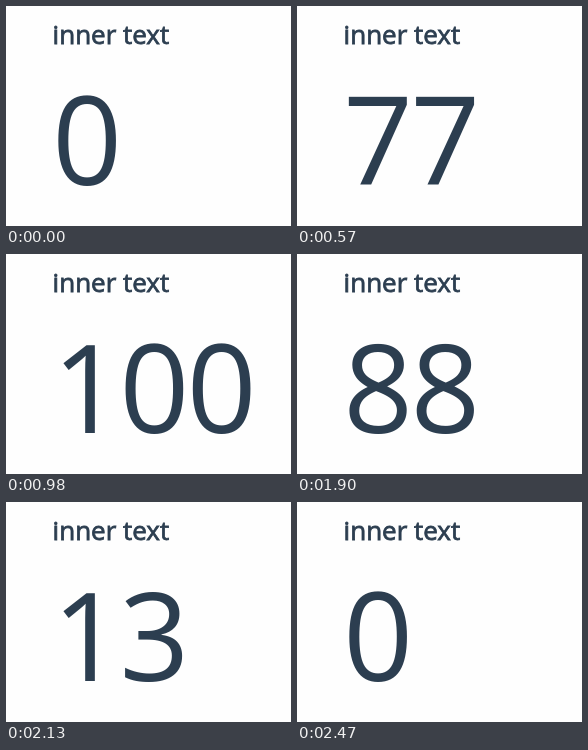
These frames come from a looping animation (285 by 220 pixels, 2.75 s). An HTML page:

```html
<!DOCTYPE html>
<html lang="en">
<head>
<meta charset="utf-8">
<title>Counter</title>
<style>
  html, body { margin: 0; width: 100%; height: 100%; overflow: hidden; background: #fefefe; }
  svg { display: block; width: 100vw; height: 100vh; }
  text { fill: #2c3e50; font-family: "Open Sans", "Noto Sans", sans-serif; }
  .title { font-size: 26px; stroke: #2c3e50; stroke-width: 0.8px; }
  .count { font-size: 122px; letter-spacing: -2.5px; }
</style>
</head>
<body>
<svg viewBox="0 0 285 220">
  <text class="title" x="46.6" y="38">inner text</text>
  <text class="count" id="count" x="46.2" y="179">0</text>
</svg>
<script>
  const LOOP = 2750;
  const UP = 400;
  const DOWN = 1900;
  // Moments, after each start, at which the shown number refreshes
  const upTicks = [0, 50, 80, 130, 170, 210, 260, 310, 340, 390, 440, 580];
  const downTicks = [0, 30, 80, 130, 180, 230, 260, 300, 340, 390, 440, 570];
  const label = document.getElementById('count');

  // Distance left to the goal, easing out
  const left = ms => Math.round(88 * Math.pow(1 - ms / 850, 6));
  const lastTick = (ticks, ms) => ticks.filter(t => t <= ms).pop();

  function valueAt(ms) {
    if (ms < UP) return 0;
    if (ms < DOWN) return 100 - left(lastTick(upTicks, ms - UP));
    return left(lastTick(downTicks, ms - DOWN));
  }

  const start = performance.now();
  function draw(now) {
    const value = String(valueAt(Math.max(0, now - start) % LOOP));
    if (label.textContent !== value) label.textContent = value;
    requestAnimationFrame(draw);
  }
  draw(start);
</script>
</body>
</html>
```
